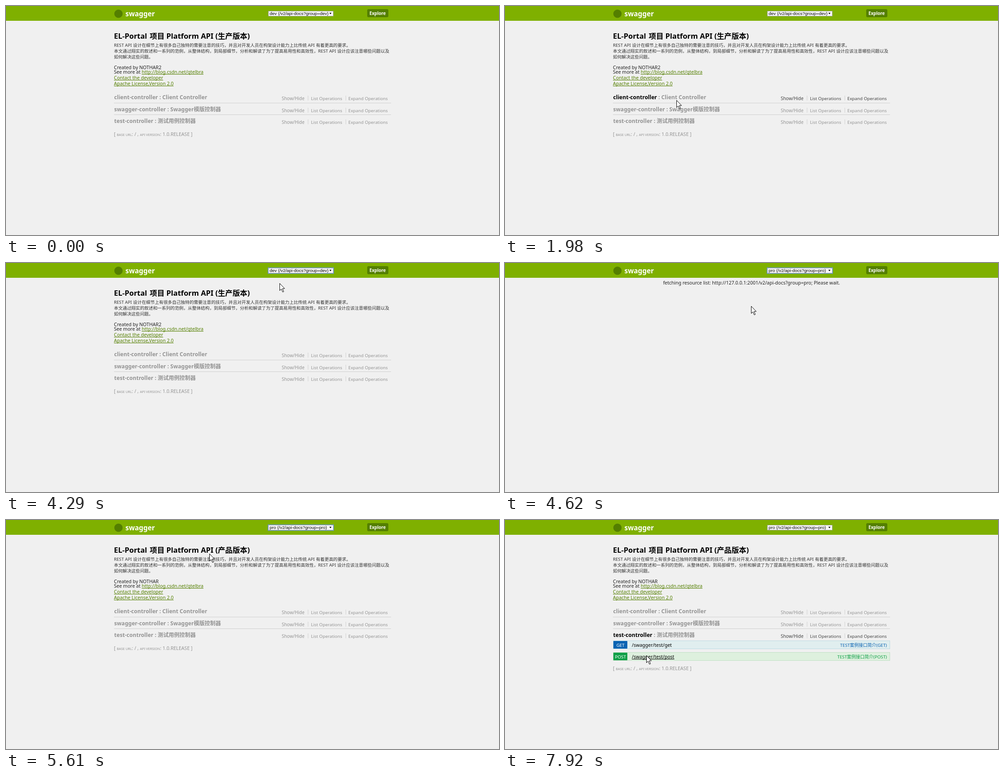
Recreate the animation shown at these times as an HTML page with a canvas. Size 1096 px wide and 511 px high, loop 8 s.

```html
<!DOCTYPE html>
<html lang="zh-CN">
<head>
<meta charset="utf-8">
<title>API docs</title>
<style>
  html, body { margin: 0; width: 100%; height: 100%; overflow: hidden; background: #f0f0f0; }
  canvas { display: block; }
</style>
</head>
<body>
<canvas id="stage" width="1096" height="511"></canvas>
<script>
const ctx = document.getElementById('stage').getContext('2d');
const LOOP = 8000, STEP = 330;
const SANS = '"Noto Sans", "Noto Sans CJK SC", "Noto Sans CJK", sans-serif';
const ARIAL = '"Liberation Sans", Arial, sans-serif';
const GREY = '#949494', GREEN = '#547f00';

// Pointer position for each step, starting at step 3 (990 ms).
const POINTER = [
  [845, 492], [782, 500], [508, 448], [381, 210], [394, 169], [470, 150], [620, 16],
  [615, 28], [599, 46], [604, 34], [608, 45], [547, 96], [490, 150], [420, 211],
  [452, 75], [515, 72], [420, 161], [327, 267], [307, 266], [307, 266], [310, 285], [314, 302]
];

const DESCRIPTION = [
  'REST API 设计在细节上有很多自己独特的需要注意的技巧，并且对开发人员在构架设计能力上比传统 API 有着更高的要求。',
  '本文通过翔实的叙述和一系列的范例，从整体结构，到局部细节，分析和解读了为了提高易用性和高效性，REST API 设计应该注意哪些问题以及',
  '如何解决这些问题。'
];

const CONTROLLERS = [
  ['client-controller', 'Client Controller'],
  ['swagger-controller', 'Swagger模版控制器'],
  ['test-controller', '测试用例控制器']
];

function rect(x, y, w, h, color) {
  ctx.fillStyle = color;
  ctx.fillRect(x, y, w, h);
}

function roundRect(x, y, w, h, radius, color) {
  ctx.fillStyle = color;
  ctx.beginPath();
  ctx.roundRect(x, y, w, h, radius);
  ctx.fill();
}

function frame(x, y, w, h, fill, stroke) {
  rect(x, y, w, h, stroke);
  rect(x + 1, y + 1, w - 2, h - 2, fill);
}

// Draws text on a baseline and returns the x where it ends.
function text(str, x, y, size, color, { bold, align = 'left', family = SANS, underline } = {}) {
  ctx.font = `${bold ? 'bold ' : ''}${size}px ${family}`;
  ctx.textAlign = align;
  ctx.fillStyle = color;
  ctx.fillText(str, x, y);
  const width = ctx.measureText(str).width;
  if (underline) ctx.fillRect(x, y + 1, width, 1);
  return x + width;
}

function drawHeader(group, focused) {
  rect(0, 0, 1096, 33, '#7fb000');
  ctx.fillStyle = GREEN;
  ctx.beginPath();
  ctx.arc(250, 17.3, 9.2, 0, Math.PI * 2);
  ctx.fill();
  text('swagger', 265.5, 23, 15.35, '#fff', { bold: true });

  if (focused) rect(582, 10, 147, 14, '#5a96e0');
  frame(583, 11, 145, 12, '#f8f8f8', '#a9a9a9');
  text(`${group} (/v2/api-docs?group=${group})`, 586, 20, 9.88, '#000', { family: ARIAL });
  ctx.beginPath();
  ctx.moveTo(719, 15);
  ctx.lineTo(723.6, 15);
  ctx.lineTo(721.3, 18.6);
  ctx.fill();

  roundRect(803, 7, 47, 18, 3, GREEN);
  text('Explore', 808, 20, 9.76, '#fff', { bold: true });
}

function drawInfo(production) {
  text('EL-Portal', 240, 73, 16.4, '#000', { bold: true });
  text(`项目 Platform API (${production ? '产品' : '生产'}版本)`, 319.5, 73, 16.4, '#000', { bold: true });
  DESCRIPTION.forEach((line, i) => text(line, 240, 91 + i * 13, 9.67, '#333'));

  text(`Created by NOTHAR${production ? '' : '2'}`, 240, 141, 10.6, '#222');
  const end = text('See more at ', 240, 151, 10.5, '#222');
  const link = { underline: true };
  text('http://blog.csdn.net/qtelbra', end, 151, 10.5, GREEN, link);
  text('Contact the developer', 240, 164, 10.55, GREEN, link);
  text('Apache License,Version 2.0', 240, 177, 10.5, GREEN, link);
}

function drawControllers(hovered, underlined) {
  CONTROLLERS.forEach(([name, title], i) => {
    const y = Math.round(208 + i * 26.5);
    const active = hovered === i;
    const end = text(name, 240.5, y, 12.08, active ? '#000' : GREY,
      { bold: true, underline: active && underlined });
    text(' : ' + title, end, y, 12.08, GREY, { bold: true });

    const color = active ? '#444' : GREY;
    text('Show/Hide', 613, y + 2, 9.95, color);
    text('List Operations', 678, y + 2, 9.75, color);
    text('Expand Operations', 761, y + 2, 9.77, color);
    for (const x of [671, 755]) rect(x, y - 8, 1, 11, '#d2d2d2');
    if (i < 2) rect(240, 216 + i * 26, 616, 1, '#d0d0d0');
  });
}

function drawOperation(y, method, color, fill, stroke, underline) {
  frame(240, y, 616, 19, fill, stroke);
  roundRect(241, y + 1, 31, 17, 1, color);
  text(method, 256.7, y + 14, 9.8, '#fff', { align: 'center' });
  text('/swagger/test/' + method.toLowerCase(), 282, y + 14, 10.53, '#000', { underline });
  text(`TEST案例接口简介(${method})`, 849, y + 14, 9.76, color, { align: 'right' });
}

function drawOperations(height, postHovered) {
  ctx.save();
  ctx.beginPath();
  ctx.rect(240, 266, 617, height + 3);
  ctx.clip();
  drawOperation(269, 'GET', '#0a63b2', '#e0eeef', '#bcdae4', false);
  drawOperation(295, 'POST', '#10a048', '#def0de', '#bfe0c4', postHovered);
  ctx.restore();
}

function drawFooter(y) {
  const size = 10.6, small = size * 0.7;
  const runs = [
    ['[ ', size], ['BASE URL', small], [': / , ', size],
    ['API VERSION', small], [': 1.0.RELEASE ]', size]
  ];
  runs.reduce((x, [str, s]) => text(str, x, y, s, GREY), 240);
}

function drawPointer([x, y]) {
  ctx.beginPath();
  [[0, 0], [0, 16], [3.6, 12.6], [6.6, 19.3], [9, 18.3], [6.1, 11.6], [11, 11.6]]
    .forEach(([dx, dy]) => ctx.lineTo(x + 0.5 + dx, y + 0.5 + dy));
  ctx.closePath();
  ctx.fillStyle = '#fff';
  ctx.fill();
  ctx.strokeStyle = '#000';
  ctx.lineWidth = 1;
  ctx.stroke();
}

function hoveredRow(step) {
  if (step === 6 || step === 7 || step === 16) return 0;
  return step >= 20 ? 2 : -1;
}

function draw(time) {
  const step = Math.floor(time / STEP);
  const production = step >= 14;
  rect(0, 0, 1096, 511, '#f0f0f0');
  drawHeader(production ? 'pro' : 'dev', step >= 9 && step < 22);

  if (step === 14) {
    text('fetching resource list: http://127.0.0.1:2001/v2/api-docs?group=pro; Please wait.',
      548, 48, 10.53, '#222', { align: 'center' });
  } else {
    const panel = step < 22 ? 0 : step === 22 ? 24 : 45;
    drawInfo(production);
    drawControllers(hoveredRow(step), step === 21);
    if (panel) drawOperations(panel, step === 24);
    drawFooter(290 + panel);
  }
  if (step >= 3) drawPointer(POINTER[step - 3]);
}

function tick(now) {
  draw(now % LOOP);
  requestAnimationFrame(tick);
}
draw(0);
requestAnimationFrame(tick);
</script>
</body>
</html>
```
